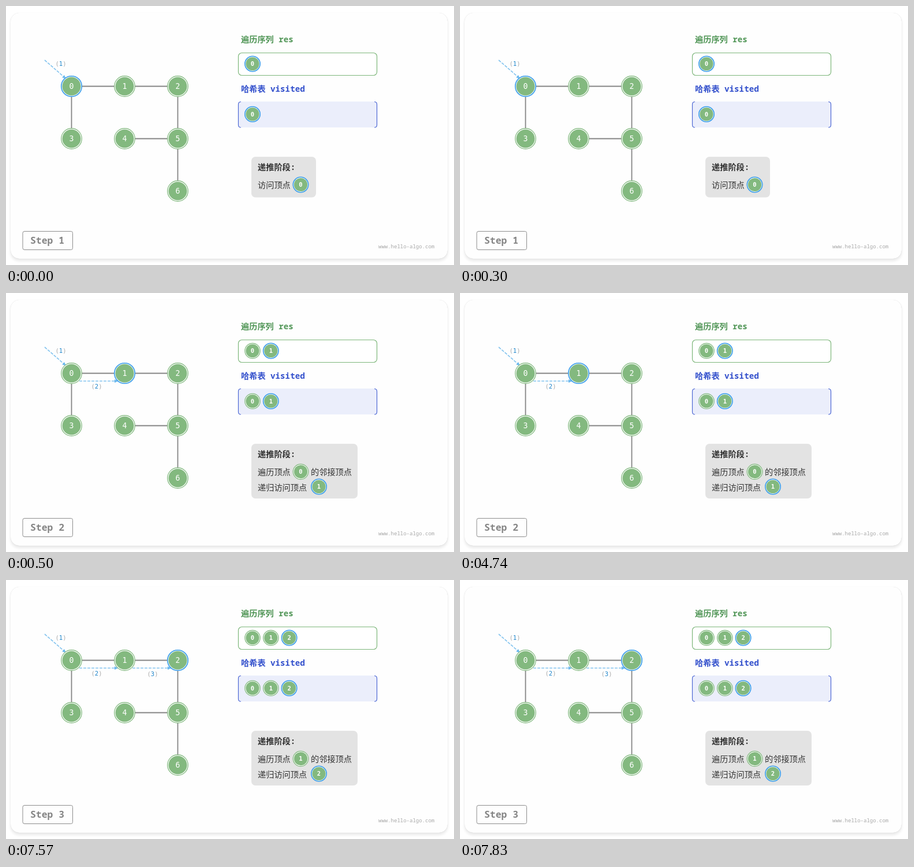
An HTML page that plays this animation: 776 by 450 pixels, repeating every 8 s.

```html
<!DOCTYPE html>
<html lang="zh-CN">
<head>
<meta charset="utf-8">
<title>Graph depth-first traversal</title>
<style>
  html, body { margin: 0; width: 100%; height: 100%; overflow: hidden; background: #fff; }
  .card {
    position: absolute; left: 8px; top: 12px; width: 757px; height: 427px;
    border-radius: 15px; background: #fefefe;
    box-shadow: 0 0 1px rgba(0,0,0,.18), 0 4px 5px rgba(0,0,0,.09);
  }
  svg { position: absolute; left: 0; top: 0; display: block; }
  text { font-family: "Noto Sans Mono", "Noto Sans CJK SC", "Noto Sans CJK", monospace; font-size: 14.2px; white-space: pre; }
  .bold { font-weight: 700; }
  .digit { font-family: "DejaVu Sans Mono", monospace; text-anchor: middle; fill: #fff; }
  .order { font-family: "DejaVu Sans Mono", monospace; font-size: 10.5px; text-anchor: middle; fill: #aaa; }
  .order tspan { fill: #1f86cc; }
  .edge { stroke: #858585; stroke-width: 1.8; }
  .arrow line { stroke: #86c5ef; stroke-width: 1.7; stroke-dasharray: 5 2; }
  .arrow path { fill: #6db9ee; }
</style>
</head>
<body>
<div class="card"></div>
<svg id="stage" width="776" height="450" viewBox="0 0 776 450">
  <text class="bold" x="407" y="63" fill="#519657">遍历序列 res</text>
  <rect x="402.5" y="81.5" width="240" height="39" rx="6" fill="#fff" stroke="#7db67a" stroke-width="1.2"/>
  <text class="bold" x="407" y="149" fill="#3350cc">哈希表 visited</text>
  <rect x="402.5" y="166" width="240" height="45" rx="5" fill="#ebeefb"/>
  <path d="M407 166.5Q402.5 166.5 402.5 171V206.5Q402.5 211 407 211M638 166.5Q642.5 166.5 642.5 171V206.5Q642.5 211 638 211"
        fill="none" stroke="#4d68d4" stroke-width="1.2"/>
  <rect x="29" y="391.5" width="86.5" height="32" rx="3" fill="#fefefe" stroke="#8c8c8c"/>
  <text x="645" y="421" fill="#a9a9a9" style="font-size:9px">www.hello-algo.com</text>
  <g id="edges"></g>
  <g id="scene"></g>
</svg>
<script>
const DURATION = 8000;
const STARTS = [0, 500, 7570];
const NODES = [[113.5, 139.5], [205.5, 139.5], [297.5, 139.5], [113.5, 230.5],
               [205.5, 230.5], [297.5, 230.5], [297.5, 321.5]];
const EDGES = [[0, 1], [1, 2], [0, 3], [2, 5], [4, 5], [5, 6]];
// Start, end, then the label's centre and baseline
const ARROWS = [[67, 94, 103, 125.5, 95, 104], [127, 153, 193, 153, 157, 166],
                [219, 153, 285, 153, 254, 166.5]];

const scene = document.getElementById('scene');

function node(x, y, label, active, small) {
  const r = small ? 13.2 : 17.8;
  const size = small ? 10.5 : 13.2;
  return `<circle cx="${x}" cy="${y}" r="${r}" fill="${active ? '#eaf5fd' : '#fff'}"
      stroke="${active ? '#3c9eea' : '#7db67a'}" stroke-width="${active ? 1.6 : 1.2}"/>
    <circle cx="${x}" cy="${y}" r="${small ? 11.6 : 16}" fill="#83b97f"/>
    <text class="digit${small ? ' bold' : ''}" x="${x}" y="${y + size * .365}" style="font-size:${size}px">${label}</text>`;
}

function arrow([x1, y1, x2, y2, tx, ty], i) {
  const angle = Math.atan2(y2 - y1, x2 - x1) * 180 / Math.PI;
  return `<g class="arrow"><line x1="${x1}" y1="${y1}" x2="${x2}" y2="${y2}"/>
    <path d="M1 0L-5 -3V3Z" transform="translate(${x2} ${y2}) rotate(${angle})"/></g>
    <text class="order" x="${tx}" y="${ty}">(<tspan>${i + 1}</tspan>)</text>`;
}

function words(x, y, text, bold) {
  return `<text x="${x}" y="${y}" fill="#333"${bold ? ' class="bold"' : ''}>${text}</text>`;
}

function note(step) {
  const first = step === 0;
  const box = `<rect x="425" y="262" width="${first ? 112 : 184}" height="${first ? 70.5 : 95}" rx="7" fill="#e3e3e3"/>`
    + words(436, 285, '递推阶段:', true);
  if (first) return box + words(436, 316, '访问顶点') + node(510.5, 310.5, 0, true, true);
  return box + words(436, 316, '遍历顶点') + node(510.5, 310.5, step - 1, false, true)
    + words(528, 316, '的邻接顶点') + words(436, 342.5, '递归访问顶点')
    + node(542, 336.5, step, true, true);
}

function draw(step) {
  let out = ARROWS.slice(0, step + 1).map(arrow).join('');
  out += NODES.map(([x, y], i) => node(x, y, i, i === step)).join('');
  for (let i = 0; i <= step; i++) {
    const x = 427 + i * 31.8;
    out += node(x, 100.5, i, i === step, true) + node(x, 188, i, i === step, true);
  }
  out += note(step);
  out += `<text class="bold" x="42" y="412.5" fill="#858585" style="font-size:16.4px">Step ${step + 1}</text>`;
  scene.innerHTML = out;
}

document.getElementById('edges').innerHTML = EDGES.map(([a, b]) =>
  `<line class="edge" x1="${NODES[a][0]}" y1="${NODES[a][1]}" x2="${NODES[b][0]}" y2="${NODES[b][1]}"/>`).join('');

let shown = -1;
const origin = performance.now();
function tick() {
  const time = (performance.now() - origin) % DURATION;
  const step = STARTS.filter(start => start <= time).length - 1;
  if (step !== shown) draw(shown = step);
  requestAnimationFrame(tick);
}
tick();
</script>
</body>
</html>
```
